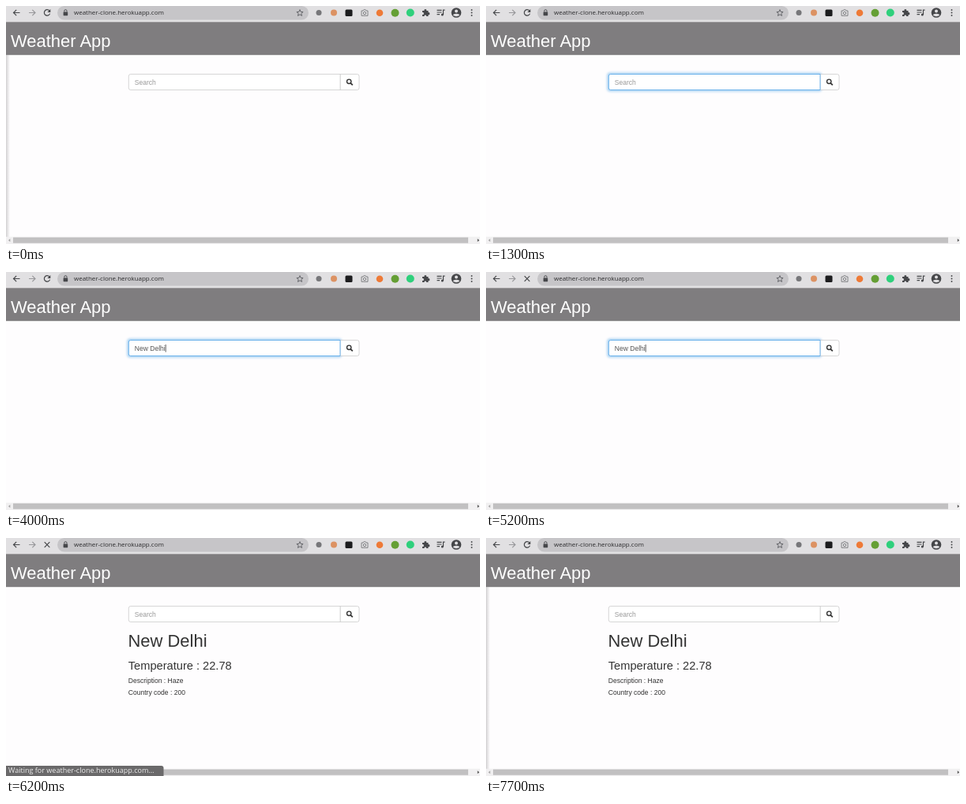
An HTML page for the animation above (7.8 s loop, 600 by 302 pixels).

```html
<!DOCTYPE html>
<html lang="en">
<head>
<meta charset="utf-8">
<title>Weather App</title>
<style>
html, body { margin: 0; width: 100%; height: 100%; overflow: hidden; background: #fefdfe; }
svg { display: block; width: 600px; height: 302px; }
text { font-family: "Liberation Sans", Arial, sans-serif; fill: #333; white-space: pre; }
.ui { font-family: "Open Sans", "Noto Sans", sans-serif; }
.line { fill: none; stroke: #46474a; stroke-width: 1.2; }
.ink { fill: #46474a; }
</style>
</head>
<body>
<svg viewBox="0 0 600 302" xmlns="http://www.w3.org/2000/svg">
  <defs>
    <linearGradient id="edge">
      <stop offset="0" stop-color="#000" stop-opacity=".17"/>
      <stop offset="1" stop-color="#000" stop-opacity="0"/>
    </linearGradient>
    <filter id="blur" x="-5%" y="-50%" width="110%" height="200%">
      <feGaussianBlur stdDeviation="1.6"/>
    </filter>
  </defs>

  <rect width="600" height="302" fill="#fefdfe"/>

  <!-- browser bar -->
  <rect width="600" height="20.5" fill="#e1e0e2"/>
  <rect x="65" y="0" width="318" height="17.5" rx="8.7" fill="#c6c5c8"/>
  <path class="line" d="M17.5 8.5H9.7M13.2 4.8L9.5 8.5L13.2 12.2"/>
  <path class="line" d="M29 8.5H36.8M33.3 4.8L37 8.5L33.3 12.2" style="stroke:#98989b"/>
  <g id="reload">
    <path class="line" d="M55 6.1A3.7 3.7 0 1 0 55.6 9.6"/>
    <path class="ink" d="M56.3 4V7.9H52.4Z"/>
  </g>
  <path id="stop" class="line" d="M48.7 5.2L55.3 11.8M55.3 5.2L48.7 11.8"/>
  <rect class="ink" x="72.6" y="7.4" width="5.6" height="4.8" rx=".6"/>
  <path class="line" d="M73.8 7.6V6.2a1.6 1.6 0 0 1 3.2 0V7.6" style="stroke-width:.9"/>
  <text class="ui" x="86" y="11.3" font-size="7.97" style="fill:#29292b">weather-clone.herokuapp.com</text>
  <path id="star" class="line" style="stroke-width:.9;stroke:#5b5c60"/>

  <circle cx="396" cy="8.5" r="3.5" fill="#77777a"/>
  <circle cx="415" cy="8.5" r="4" fill="#dc9263"/>
  <rect x="429.5" y="4.5" width="9" height="8.5" rx="1.5" fill="#1d1d1f"/>
  <g fill="none" stroke="#808184">
    <path d="M450 6H452L452.8 4.8H455.2L456 6H458V12.3H450Z"/>
    <circle cx="454" cy="9" r="1.7"/>
  </g>
  <circle cx="473" cy="8.7" r="4.3" fill="#ee7a37"/>
  <circle cx="492.5" cy="8.7" r="5" fill="#659f35"/>
  <circle cx="511.8" cy="8.5" r="5" fill="#2fd07c"/>
  <path class="ink" d="M527 6H529.4a1.5 1.5 0 1 1 2.9 0H534.5V8.2a1.5 1.5 0 1 1 0 2.9V13H532.2a1.4 1.4 0 1 0 -2.8 0H527V10.7a1.4 1.4 0 1 0 0 -2.6Z"/>
  <path class="line" d="M545.5 5.4H551.5M545.5 8H551.5M545.5 10.6H549M553.5 11V5.2H555.5"/>
  <circle class="ink" cx="552.3" cy="11" r="1.5"/>
  <circle class="ink" cx="570" cy="8.5" r="6.3"/>
  <circle cx="570" cy="6.5" r="2" fill="#e1e0e2"/>
  <path d="M566 12.1Q566 9.7 570 9.7T574 12.1Q570 14.3 566 12.1Z" fill="#e1e0e2"/>
  <g class="ink">
    <circle cx="589.5" cy="5" r=".95"/><circle cx="589.5" cy="8.5" r=".95"/><circle cx="589.5" cy="12" r=".95"/>
  </g>

  <!-- page -->
  <rect y="20.3" width="600" height="41.9" fill="#7f7d7f"/>
  <text x="6" y="52" font-size="21.96" style="fill:#fff">Weather App</text>

  <rect id="glow" x="154.8" y="86" width="269" height="21" rx="2.5" fill="none" stroke="#66afe9" stroke-width="3" filter="url(#blur)"/>
  <path d="M423 86.5H444.5a2.5 2.5 0 0 1 2.5 2.5V104a2.5 2.5 0 0 1 -2.5 2.5H423Z" fill="#fff" stroke="#ccc" stroke-width=".8"/>
  <path id="field" d="M423 86.5H157.8a2.5 2.5 0 0 0 -2.5 2.5V104a2.5 2.5 0 0 0 2.5 2.5H423Z" fill="#fff"/>
  <circle cx="434.2" cy="95.8" r="2.7" fill="none" stroke="#333" stroke-width="1.4"/>
  <path d="M436.2 97.8L438.8 100.4" stroke="#333" stroke-width="1.8"/>
  <text id="hint" x="162.8" y="99.8" font-size="8.54" style="fill:#999">Search</text>
  <text id="query" x="162.8" y="99.8" font-size="8.54" style="fill:#555"></text>
  <rect id="caret" y="92" width=".8" height="9.6" fill="#333"/>

  <g id="result">
    <text x="154.5" y="138.2" font-size="21.96">New Delhi</text>
    <text x="154.8" y="167.3" font-size="14.64">Temperature : 22.78</text>
    <text x="154.8" y="183.8" font-size="8.54">Description : Haze</text>
    <text x="154.8" y="198.9" font-size="8.54">Country code : 200</text>
  </g>

  <rect id="shade" y="62.2" width="5" height="231" fill="url(#edge)"/>

  <!-- scrollbar and status -->
  <rect y="292.8" width="600" height="9.2" fill="#f1f0f1"/>
  <rect x="9" y="293.6" width="576" height="7.2" fill="#c1c0c1"/>
  <path d="M5.3 295.3V299.3L3 297.3Z" fill="#a3a3a3"/>
  <path d="M596.8 295.3V299.3L599.1 297.3Z" fill="#505050"/>
  <g id="status">
    <path d="M0 289H196.5a3 3 0 0 1 3 3V302H0Z" fill="#6a696a"/>
    <text class="ui" x="3" y="298.4" font-size="9.04" style="fill:#ececec">Waiting for weather-clone.herokuapp.com…</text>
  </g>
</svg>
<script>
const LOOP = 7800;
const CITY = "New Delhi";
const KEYS = [1600, 1900, 2100, 2300, 2800, 3100, 3400, 3800, 4000];
const LOADED = 6100;

const el = {};
document.querySelectorAll("[id]").forEach(e => el[e.id] = e);

const ramp = (t, a, b) => Math.min(1, Math.max(0, (t - a) / (b - a)));
const between = (t, a, b) => t >= a && t < b;
const show = (e, on) => e.setAttribute("visibility", on ? "visible" : "hidden");
const fade = (e, v) => e.setAttribute("opacity", v);
const mix = (a, b, k) => "rgb(" + a.map((v, i) => Math.round(v + (b[i] - v) * k)) + ")";

function starPath(cx, cy, outer, inner) {
  const points = Array.from({ length: 10 }, (_, i) => {
    const r = i % 2 ? inner : outer, a = i * Math.PI / 5;
    return (cx + r * Math.sin(a)).toFixed(2) + " " + (cy - r * Math.cos(a)).toFixed(2);
  });
  return "M" + points.join("L") + "Z";
}
el.star.setAttribute("d", starPath(372, 8.9, 4.3, 1.9));

// caret position after each typed letter
const ADVANCE = [.722, .556, .722, .278, .722, .556, .222, .556, .222];
const caretX = n => 162.8 + 8.54 * ADVANCE.slice(0, n).reduce((a, b) => a + b, 0);

function draw(t) {
  const loaded = t >= LOADED;
  const typed = loaded ? 0 : KEYS.filter(k => t >= k).length;
  const focus = loaded ? 0 : ramp(t, 900, 1300);
  const loading = between(t, 4500, 6300);

  show(el.reload, !loading);
  show(el.stop, loading);

  fade(el.glow, focus * .6);
  el.field.setAttribute("stroke", mix([204, 204, 204], [102, 175, 233], focus));
  el.field.setAttribute("stroke-width", .8 + .2 * focus);

  show(el.hint, typed === 0);
  const text = CITY.slice(0, typed);
  if (el.query.textContent !== text) el.query.textContent = text;
  show(el.caret, typed > 0 && !between(t, 4500, 5200));
  el.caret.setAttribute("x", caretX(typed));

  show(el.result, loaded);
  show(el.status, between(t, 5300, 6800));
  fade(el.status, 1 - .8 * ramp(t, 6300, 6800));
  fade(el.shade, loaded ? ramp(t, 6700, 7100) : 1 - ramp(t, 100, 900));
}

const start = performance.now();
function tick() {
  draw((performance.now() - start) % LOOP);
  requestAnimationFrame(tick);
}
draw(0);
requestAnimationFrame(tick);
</script>
</body>
</html>
```
